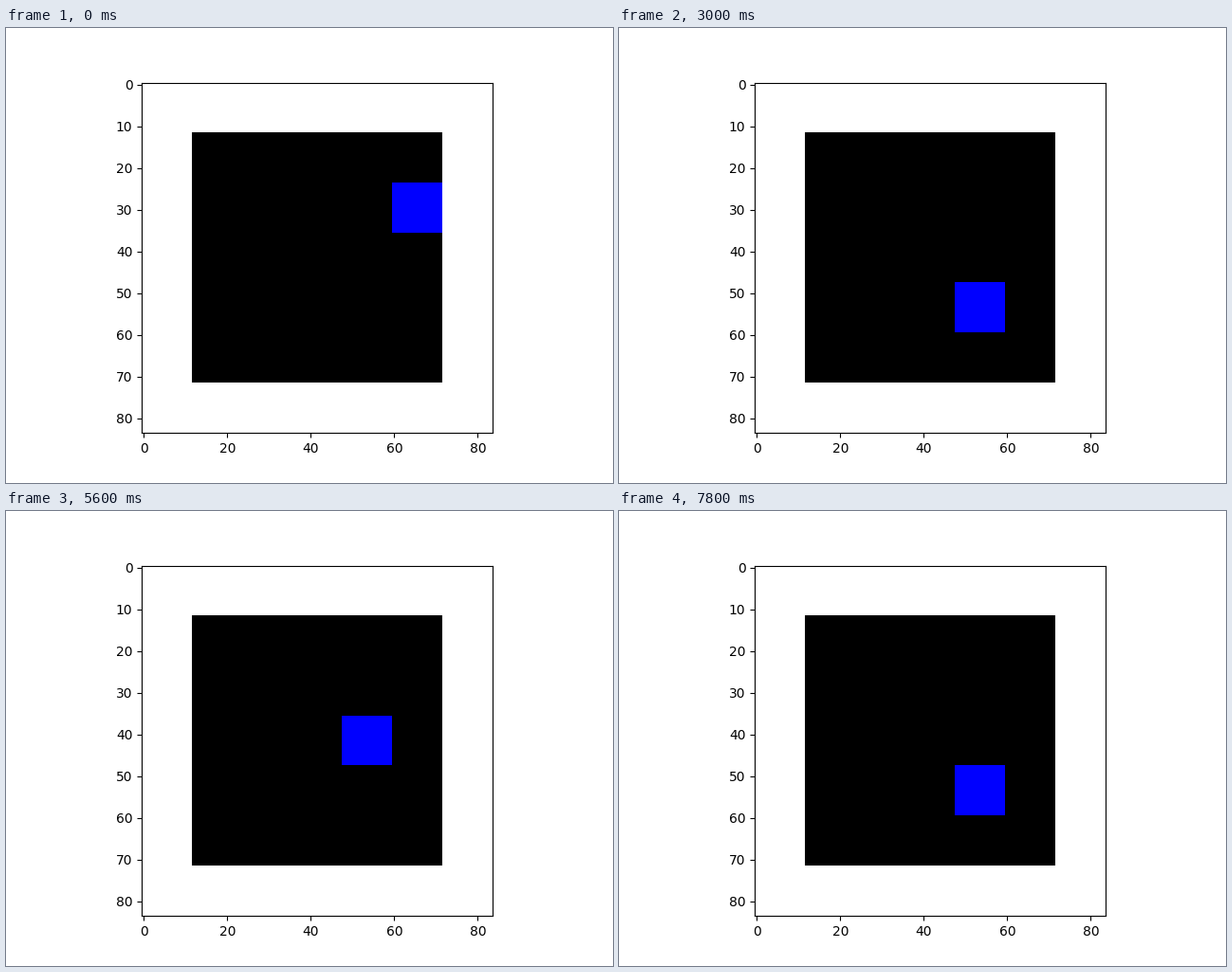
Recreate the animation shown at these times as a matplotlib script. Size 640 px wide and 480 px high, loop 8000 ms.

```python
import matplotlib.pyplot as plt
import numpy as np
from matplotlib.animation import FuncAnimation

CELL = 12       # pixels per grid cell
GRID = 7        # cells per side, including the white border
FRAMES = 40
STEP_MS = 200

START = [(2, 5), (2, 4)]    # (row, column) of the opening moves
PACE = [(3, 4), (4, 4)]     # then up and down between these two


def agent_cell(i):
    return START[i] if i < len(START) else PACE[i % 2]


def grid_image(i):
    img = np.full((GRID * CELL, GRID * CELL, 3), 255, dtype=np.uint8)
    img[CELL:-CELL, CELL:-CELL] = 0
    row, col = agent_cell(i)
    y, x = row * CELL, col * CELL
    img[y:y + CELL, x:x + CELL] = (0, 0, 255)
    return img


fig, ax = plt.subplots(figsize=(6.4, 4.8), dpi=100)
picture = ax.imshow(grid_image(0))


def update(i):
    picture.set_data(grid_image(i))
    return [picture]


anim = FuncAnimation(fig, update, frames=FRAMES, interval=STEP_MS,
                     repeat=True, repeat_delay=0, blit=False)
plt.show()
```
